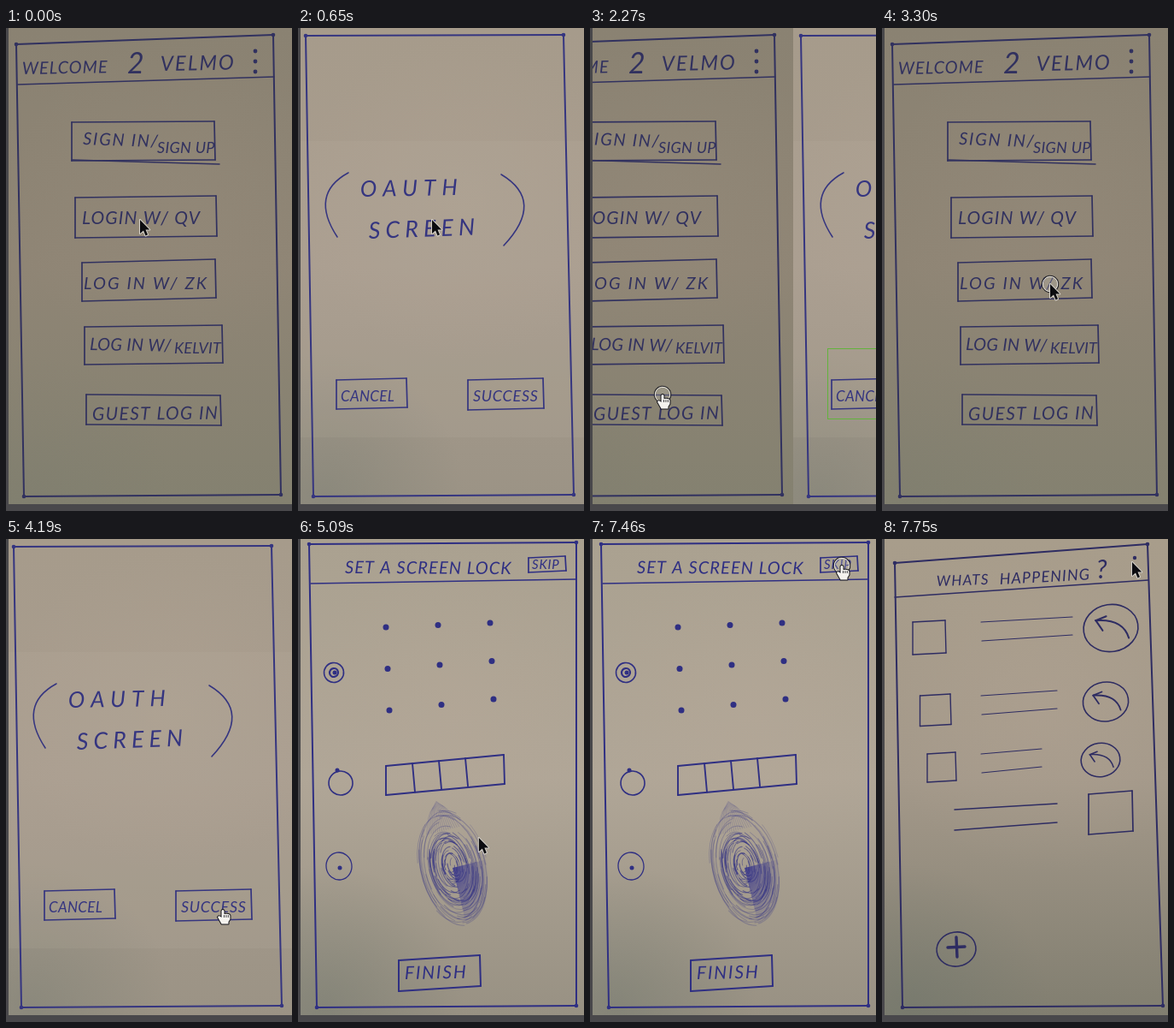
Write an HTML page with a canvas that moves like this. It is 335 px wide and 564 px high and loops after 8000 ms.

```html
<!DOCTYPE html>
<html lang="en">
<head>
<meta charset="utf-8">
<title>Paper prototype</title>
<style>
html, body { margin: 0; width: 100%; height: 100%; overflow: hidden; background: #49484b; }
canvas { display: block; width: 335px; height: 564px; }
</style>
</head>
<body>
<canvas id="stage"></canvas>
<script>
const W = 335, H = 564, PAGE_H = 556, LOOP = 8000, TICK = 147;
const canvas = document.getElementById('stage');
const dpr = window.devicePixelRatio || 1;
canvas.width = W * dpr;
canvas.height = H * dpr;
const g = canvas.getContext('2d');
g.scale(dpr, dpr);

function setInk(color) {
  g.strokeStyle = g.fillStyle = color;
  g.lineCap = g.lineJoin = 'round';
}

function line(x0, y0, x1, y1, width = 1.5) {
  g.lineWidth = width;
  g.beginPath();
  g.moveTo(x0, y0);
  g.lineTo(x1, y1);
  g.stroke();
}

function curve(x0, y0, cx, cy, x1, y1, width = 1.6) {
  g.lineWidth = width;
  g.beginPath();
  g.moveTo(x0, y0);
  g.quadraticCurveTo(cx, cy, x1, y1);
  g.stroke();
}

function oval(x, y, rx, ry = rx, width = 1.6) {
  g.lineWidth = width;
  g.beginPath();
  g.ellipse(x, y, rx, ry, -0.15, 0, 7);
  g.stroke();
}

function dot(x, y, r) {
  g.beginPath();
  g.arc(x, y, r, 0, 7);
  g.fill();
}

// Freehand rectangle whose right side sits a little higher than its left
function box(x, y, w, h, rise = 2, width = 1.7) {
  line(x, y, x + w, y - rise, width);
  line(x + w, y - rise, x + w + 1, y + h - rise, width);
  line(x + w + 1, y + h - rise, x, y + h, width);
  line(x, y + h, x, y, width);
}

function border(left, top, right, topRight, drift = 12) {
  const corners = [[left, top], [right, topRight], [right + drift, 545], [left + 9, 547]];
  corners.forEach(([x, y], i) => {
    line(x, y, ...corners[(i + 1) % 4], 2);
    dot(x, y, 2.3);
  });
}

function write(text, x, y, size, track = 0, tilt = 0) {
  g.save();
  g.translate(x, y);
  g.rotate(tilt * Math.PI / 180);
  g.font = `italic 400 ${size}px Lato, sans-serif`;
  g.letterSpacing = track + 'px';
  g.fillText(text, 0, 0);
  g.restore();
}

function glow(x, y, r, rgb, alpha) {
  const soft = g.createRadialGradient(x, y, 0, x, y, r);
  soft.addColorStop(0, `rgba(${rgb},${alpha})`);
  soft.addColorStop(1, `rgba(${rgb},0)`);
  g.fillStyle = soft;
  g.fillRect(0, 0, W, PAGE_H);
}

// Paper tone with a warm middle and a cool lower-left corner
function paper(top, middle, bottom, light = 0.3, shade = 0.35) {
  const base = g.createLinearGradient(0, 0, 0, PAGE_H);
  [top, middle, bottom].forEach((c, i) => base.addColorStop(i / 2, c));
  g.fillStyle = base;
  g.fillRect(0, 0, W, PAGE_H);
  glow(190, 200, 190, '184,168,152', light);
  glow(30, 545, 165, '108,116,106', shade);
}

function welcome() {
  paper('#8a8272', '#8f8575', '#848170', 0.08, 0.15);
  setInk('#31315f');
  border(12, 19, 313, 8, 9);
  line(14, 66, 314, 57);
  for (let i = 0; i < 3; i++) dot(292, 27 + 12 * i, 2.4);
  write('WELCOME', 19, 54, 20, 1, -1);
  write('2', 142, 53, 34);
  write('VELMO', 181, 50, 24, 2, -1);

  box(77, 110, 167, 45, 1);
  line(77, 154, 250, 159);
  write('SIGN IN/', 90, 136, 20, 1.7, 2);
  write('SIGN UP', 177, 146, 18, 0.3);
  box(81, 198, 165, 47);
  write('LOGIN W/ QV', 89, 229, 21, 1.2);
  box(89, 274, 156, 45, 4);
  write('LOG IN W/ ZK', 91, 305, 20, 2.1);
  box(92, 349, 161, 44);
  write('LOG IN W/', 98, 376, 20, 0.3, 1);
  write('KELVIT', 197, 380, 18, 0.2);
  box(94, 428, 157, 35, -1);
  write('GUEST LOG IN', 101, 458, 21, 1.4, -0.5);
}

function oauth() {
  paper('#a69b8b', '#a89c8e', '#9b9385', 0.25);
  g.fillStyle = 'rgba(190,180,164,0.12)';
  g.fillRect(0, 132, W, 346);
  setInk('#353580');
  border(9, 9, 311, 8);
  curve(59, 169, 13, 194, 46, 244);
  curve(238, 171, 290, 202, 241, 254);
  write('OAUTH', 73, 197, 26, 7.2, -1);
  write('SCREEN', 83, 246, 27, 6, -2);
  box(45, 411, 82, 34);
  write('CANCEL', 50, 436, 17, 0.3);
  box(199, 411, 88, 35);
  write('SUCCESS', 205, 436, 18, 0.7);
}

// Smudged print: seeded loops, densest near the core
function fingerprint() {
  let seed = 11;
  const random = () => (seed = seed * 16807 % 2147483647) / 2147483647;
  g.save();
  g.translate(181, 384);
  g.rotate(-0.24);
  g.save();
  g.scale(0.6, 1);
  glow(0, 0, 68, '52,50,140', 0.85);
  g.restore();
  setInk('#2f2f83');
  for (let i = 0; i < 110; i++) {
    const k = 0.12 + random() * 0.88, start = random() * 7;
    g.globalAlpha = 0.15 + 0.5 * (1 - k) + random() * 0.15;
    g.lineWidth = 0.6 + random() * 0.7;
    g.beginPath();
    g.ellipse((random() - 0.5) * 9, -(1 - k) * 4, 40 * k, 70 * k, 0, start, start + 0.6 + random() * 1.6);
    g.stroke();
  }
  g.globalAlpha = 0.2;
  for (let x = -20; x <= 20; x += 2.6) {
    curve(x, -45, x * 0.7, -68, x * 0.3, -80 + Math.abs(x) / 3, 0.8);
  }
  g.restore();
}

function lock() {
  paper('#aaa190', '#b0a697', '#989183', 0.3, 0.45);
  setInk('#2f2f83');
  border(13, 6, 326, 4, 0);
  line(15, 52, 326, 47);
  write('SET A SCREEN LOCK', 55, 40, 20, 1.1, 0.3);
  box(270, 22, 43, 17);
  write('SKIP', 274, 35, 15, 0.8);
  for (let row = 0; row < 3; row++) {
    for (let col = 0; col < 3; col++) {
      dot(103 + col * 61 + row * 2, 103 + row * 48.5 - col * (2.5 + row * 2), 3.5);
    }
  }
  oval(42, 156, 11.5);
  oval(42, 156, 5, 5, 2.2);
  oval(50, 285, 14);
  oval(48, 382, 15, 16, 1.3);
  for (let i = 0; i < 3; i++) dot(43 + i * 3, 156 + i * 114, 2.5);
  box(103, 265, 138, 34, 13, 1.9);
  for (let i = 1; i < 4; i++) line(103 + i * 31, 265 - i * 3, 106 + i * 31, 299 - i * 3.5, 1.9);
  fingerprint();
  box(118, 492, 95, 36, 6, 2);
  write('FINISH', 125, 514, 21, 1.8, -1);
}

function replyIcon(x, y, r) {
  const ry = r * 0.86, hx = x - r * 0.55, hy = y - ry * 0.32, width = r / 15;
  oval(x, y, r, ry);
  curve(hx, hy, x + r * 0.45, y - ry * 0.4, x + r * 0.66, y + ry * 0.42, width);
  line(hx, hy, hx + r * 0.38, hy - ry * 0.18, width);
  line(hx, hy, hx + r * 0.25, hy + ry * 0.42, width);
}

function feed() {
  paper('#a89d8b', '#a4998a', '#817e70', 0.3, 0.45);
  setInk('#2e2c62');
  border(15, 28, 311, 6, 18);
  line(15, 68, 312, 48);
  write('WHATS', 64, 55, 17, 1.2, -2);
  write('HAPPENING', 138, 53, 18, 1.1, -3);
  write('?', 251, 46, 30);
  dot(296, 22, 2.2);
  for (let i = 0; i < 3; i++) {
    const drop = i * (95 - 9 * i), side = 38 - 2.5 * i, end = 223 - 18 * i;
    box(36 + 8.5 * i, 97 + drop, side, side, 2, 1.4);
    line(116, 97 + drop, end, 91 + drop, 1.1);
    line(117, 119 + drop, end, 112 + drop, 1.2);
    replyIcon(268 - 6 * i, 104 + drop, 32 / (1 + 0.2 * i));
  }
  line(85, 316, 205, 309);
  line(85, 340, 205, 331);
  box(242, 298, 51, 47, 4);
  oval(87, 479, 23, 20);
  line(87, 465, 88, 488, 3.4);
  line(77, 477, 97, 476, 3.4);
}

const arrowShape = new Path2D('M0 0V16L4 12.6L6.5 18.5L9 17.3L6.5 11.6H11.3Z');
const handShape = new Path2D('M-1.5 9V1Q0-1 1.5 1V5Q8 4 8.5 7V11L6.5 14V16.5H-1.5L-6 8.5Q-4.5 6-1.5 9Z');

function pointer(x, y, isHand) {
  const shape = isHand ? handShape : arrowShape;
  g.save();
  g.translate(x, y);
  g.lineJoin = 'round';
  g.lineWidth = 2;
  g.strokeStyle = isHand ? '#15151a' : '#d6d2cb';
  g.stroke(shape);
  g.fillStyle = isHand ? '#f4f2ee' : '#0c0c10';
  g.fill(shape);
  if (isHand) {
    g.strokeStyle = '#15151a';
    for (let i = 0; i < 3; i++) line(1.5 + i * 2.4, 6, 1.5 + i * 2.4, 9, 0.8);
  }
  g.restore();
}

function clickRing(x, y) {
  g.fillStyle = 'rgba(215,212,206,0.22)';
  dot(x, y, 9);
  g.strokeStyle = '#24242a';
  oval(x, y, 9.8, 9.8, 1.1);
  g.strokeStyle = '#e4e1db';
  oval(x, y, 8.7, 8.7, 1);
}

// Each scene: cursor moves, then a tap, then the next page slides in and rests at `end`.
// A move bows sideways by a share of its length; `hot` ends on a clickable spot.
const scenes = [
  { page: welcome, moves: [], tap: 500, slide: 500, end: 650 },
  { page: oauth, tap: 2270, slide: 2270, end: 2420, zone: [40.5, 374.5, 92, 82],
    moves: [{ start: 1250, end: 1980, to: [85, 428], bow: 0.67, hot: true }] },
  { page: welcome, tap: 3300, slide: 3450, end: 3450,
    moves: [{ start: 2564, end: 3300, to: [197, 299], bow: 0.15 }] },
  { page: oauth, tap: 4490, slide: 4490, end: 4640,
    moves: [{ start: 3750, end: 4190, to: [254, 433], bow: -0.33, hot: true }] },
  { page: lock, tap: 7460, slide: 7605, end: 7750,
    moves: [{ start: 5090, end: 5520, to: [288, 119], bow: 0.43 },
            { start: 5820, end: 6410, to: [295, 31], bow: 0, hot: true }] },
  { page: feed, tap: LOOP, slide: LOOP, end: LOOP,
    moves: [{ start: 7750, end: 7750, to: [293, 27], bow: 0 }] }
];
const START = [157, 224];
const SLIDE_SHOWN = 0.71;

// The cursor advances in held steps, one per tick
function stepped(t, { start, end }) {
  const count = Math.round((end - start) / TICK);
  const gap = (end - start) / count || 1;
  return Math.min(1, (Math.floor((t - start + 1) / gap) + 1) / (count + 1));
}

function bowed([x0, y0], [x1, y1], bow, p) {
  const dx = x1 - x0, dy = y1 - y0, side = 2 * p * (1 - p) * bow;
  return [x0 + dx * p + dy * side, y0 + dy * p - dx * side];
}

function cursorAt(t) {
  let at = START;
  for (const move of scenes.flatMap(s => s.moves)) {
    if (t < move.start) break;
    at = bowed(at, move.to, move.bow, stepped(t, move));
  }
  return at;
}

function drawPage(page, x) {
  g.save();
  g.beginPath();
  g.rect(x, 0, W, PAGE_H);
  g.clip();
  g.translate(x, 0);
  page();
  g.restore();
}

function drawSlide(scene, next) {
  const direction = next.page === welcome ? 1 : -1;
  const x = Math.round(direction * SLIDE_SHOWN * W);
  drawPage(scene.page, x);
  drawPage(next.page, x - direction * W);
  if (scene.zone) {
    const [left, ...rest] = scene.zone;
    g.strokeStyle = '#62b33c';
    g.lineWidth = 1;
    g.strokeRect(left + x, ...rest);
  }
}

function render(t) {
  const index = scenes.findIndex(s => t < s.end);
  const scene = scenes[index];
  if (t >= scene.slide) drawSlide(scene, scenes[index + 1]);
  else drawPage(scene.page, 0);
  g.fillStyle = '#49484b';
  g.fillRect(0, 0, 3, H);
  g.fillRect(0, PAGE_H, W, H - PAGE_H);

  const [x, y] = cursorAt(t);
  if (t >= scene.tap) clickRing(x, y);
  pointer(x, y, scene.moves.some(m => m.hot && t >= m.end));
}

function frame(now) {
  render(Math.max(0, now) % LOOP);
  requestAnimationFrame(frame);
}
render(0);
requestAnimationFrame(frame);
</script>
</body>
</html>
```
